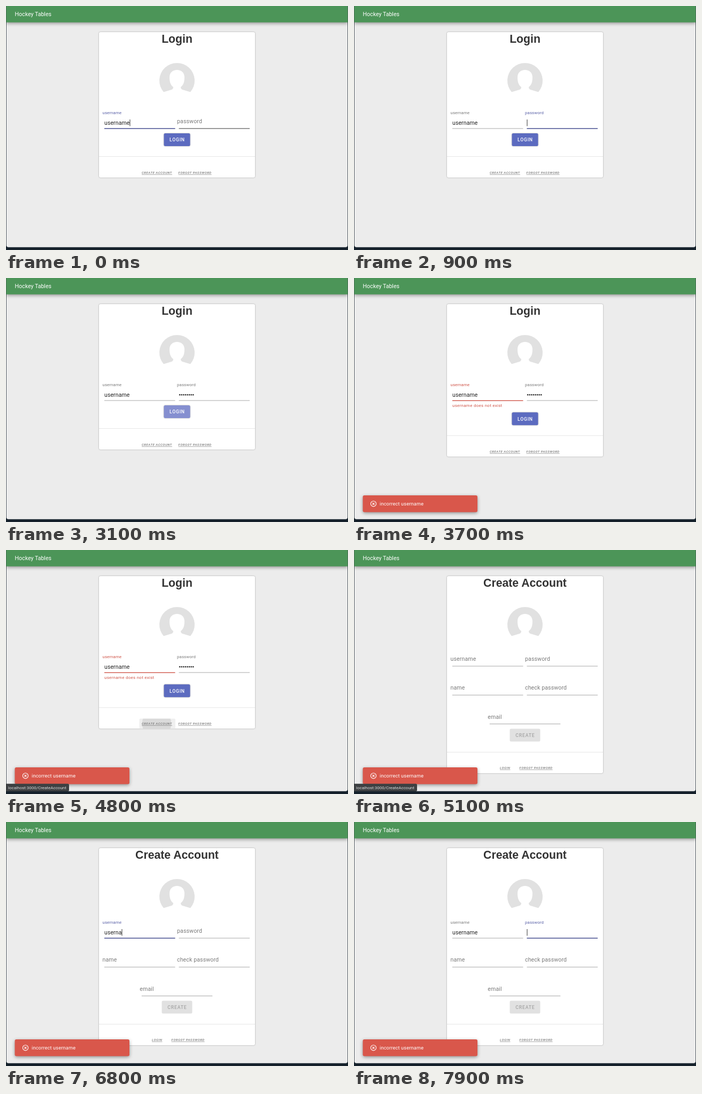
Write an HTML page that moves like this. It is 640 px wide and 458 px high and loops after 8000 ms.

```html
<!DOCTYPE html>
<html lang="en">
<head>
<meta charset="utf-8">
<title>Login flow</title>
<style>
  html, body { margin: 0; width: 100%; height: 100%; overflow: hidden; background: #16222c; }
  svg { display: block; }
  text { font-family: Roboto, sans-serif; white-space: pre; }
  .low { filter: drop-shadow(0 .7px 1px rgba(0, 0, 0, .35)); }
  .high { filter: drop-shadow(0 2px 3px rgba(0, 0, 0, .38)); }
</style>
</head>
<body>
<svg id="stage" width="640" height="458" viewBox="0 0 640 458"></svg>
<script>
const LOOP = 8000, STEP = 100;
const INDIGO = '#5b62a8', RED = '#d0564a', GRAY = '#7b7b7b';
const stage = document.getElementById('stage');
const pen = document.createElement('canvas').getContext('2d');

const ease = u => 1 - (1 - Math.min(1, Math.max(0, u))) ** 3;
const rect = (x, y, w, h, fill, extra = '') =>
  `<rect x="${x}" y="${y}" width="${w}" height="${h}" fill="${fill}" ${extra}/>`;
const text = (x, y, str, size, fill, spacing = 0.01, extra = '') =>
  `<text x="${x}" y="${y}" font-size="${size}" fill="${fill}" style="letter-spacing:${spacing}em" ${extra}>${str}</text>`;
const typed = (times, t) => times.filter(k => k <= t).length;

function textWidth(str) {
  pen.font = '10.5px Roboto, sans-serif';
  return pen.measureText(str).width + str.length * 0.105;
}

// Text field with floating label; y is the underline.
function field(t, { x, y, label, value = '', secret, focus = Infinity, blur = Infinity, keys = [], hover, error }) {
  const focused = t >= focus && t < blur;
  const lift = value ? 1 : ease((t - focus) / 150);
  const tint = error ? RED : focused ? INDIGO : GRAY;
  const lineTint = error ? RED : hover ? '#333' : '#a8a8a8';
  let out = text(x, y - 10 - 17 * lift, label, 10.6 - 2.7 * lift, tint);
  out += rect(x + 3.5, y - 0.5, 132.5, error ? 1.4 : 1, lineTint);
  if (focused) {
    const w = 132.5 * ease((t - focus) / 180);
    out += rect(x + 69.75 - w / 2, y - 0.7, w, 1.5, '#555c9f');
  }
  let end = x + 3.5;
  if (secret) {
    for (let i = 0; i < value.length; i++)
      out += `<circle cx="${x + 5.2 + i * 3.57}" cy="${y - 10.7}" r="1.25" fill="#222"/>`;
    end += value.length * 3.57;
  } else {
    out += text(x + 3.5, y - 7, value, 10.5, '#222');
    end += textWidth(value);
  }
  const last = Math.max(focus, ...keys.filter(k => k <= t));
  if (focused && (t - last) % 1000 < 500) out += rect(end, y - 17, 1, 12.5, '#333');
  return out;
}

const link = (x, y, str, line = '#777') =>
  text(x, y, str, 6, '#777', 0.09,
    `font-style="italic" font-weight="500" text-decoration="underline ${line}"`);

const avatar = `<path fill="#e1e1e1" d="M295 161.5A33 33 0 1 1 345 161.5
  L330 157Q327 156 327 152C332 149 334 142 334 134C334 125 328 120 320 120
  C312 120 306 125 306 134C306 142 308 149 313 152Q313 156 310 157Z"/>`;

function card(title, bottom) {
  return rect(174, 49, 292, bottom - 49, '#fff', 'rx="3" class="low"') +
    text(320, 69, title, 21.2, '#333', 0,
      'text-anchor="middle" font-weight="700" style="font-family:Liberation Sans,Arial,sans-serif"')
      .replace('style="letter-spacing:0em" ', '') +
    avatar + rect(174, bottom - 40, 292, 1, '#e6e6e6');
}

function button(x, y, w, label, fill, ink, extra = '') {
  return rect(x, y, w, 24, fill, 'rx="2.5" ' + extra) +
    text(x + w / 2 + 0.4, y + 15.2, label, 8.7, ink, 0.089, 'text-anchor="middle" font-weight="500"');
}

function ripple(x, y, w, h, r, ink, opacity) {
  return `<svg x="${x}" y="${y}" width="${w}" height="${h}"><circle cx="${w / 2}" cy="${h / 2}" r="${r}" fill="${ink}" opacity="${opacity}"/></svg>`;
}

function loginPage(t) {
  const failed = t >= 3400, drop = failed ? 13.3 : 0;
  const keys = [1300, 1300, 1300, 1400, 1400, 1600, 1700, 2300];
  const hot = t >= 2700 && t < 3600;
  let out = card('Login', 322 + drop);
  out += field(t, { x: 180.5, y: 230, label: 'username', value: 'username', focus: -400, blur: 600, error: failed });
  out += field(t, { x: 320, y: 230, label: 'password', value: '•'.repeat(typed(keys, t)), secret: true,
    focus: 600, blur: 3000, keys, hover: t < 600 });
  if (failed) out += text(184, 242, 'username does not exist', 8, RED, 0.033);
  out += button(295.5, 239 + drop, 49, 'LOGIN', hot ? '#6673c4' : '#5c6bc0', '#fff', 'class="low"');
  if (t >= 3000 && t < 3400)
    out += ripple(295.5, 239 + drop, 49, 24, 30 * ease((t - 2950) / 225), '#fff', 0.2);
  const over = t >= 4500;
  if (over) out += rect(249.5, 316.5, 67.5, 18.8, '#efefef', 'rx="2"');
  if (t >= 4700) out += ripple(249.5, 316.5, 65, 18.8, 33 * ease((t - 4700) / 225), '#000', 0.09);
  return out + link(254, 315 + drop, 'CREATE ACCOUNT', over ? '#c8665c' : '#777') +
    link(322.5, 315 + drop, 'FORGOT PASSWORD');
}

function createPage(t) {
  const keys = [6200, 6300, 6500, 6600, 6700, 6800, 7000, 7100];
  const name = 'username'.slice(0, typed(keys, t));
  let out = card('Create Account', 419);
  out += field(t, { x: 180.5, y: 218, label: 'username', value: name, focus: 5500, blur: 7500, keys });
  out += field(t, { x: 320, y: 218, label: 'password', focus: 7500 });
  out += field(t, { x: 180.5, y: 272.3, label: 'name' });
  out += field(t, { x: 320, y: 272.3, label: 'check password' });
  out += field(t, { x: 250.3, y: 326.5, label: 'email' });
  out += button(291.5, 335.5, 57, 'CREATE', '#e1e1e1', '#a5a5a5');
  out += link(273, 411.3, 'LOGIN') + link(309.5, 411.3, 'FORGOT PASSWORD');
  if (t >= 5600 && t < 6600)
    out += rect(184, 219, 132.5, 34.3, '#3f4244', 'rx="3" class="low"') +
      text(192, 239.7, 'user', 9, '#fff', 0.01, 'font-weight="500"');
  return out;
}

function toast(t) {
  const p = ease((t - 3350) / 150);
  return `<g opacity="${p}" transform="translate(124 424) scale(${0.8 + 0.2 * p}) translate(-124 -424)">` +
    rect(16.5, 408, 214.5, 31.5, '#d9574b', 'rx="3" class="high"') +
    `<g fill="none" stroke="#fff" stroke-width="1.1"><circle cx="36.4" cy="423.8" r="5.1"/>
     <path d="M34.4 421.8l4 4m0-4l-4 4"/></g>` +
    text(48, 427.2, 'incorrect username', 9.2, '#fff', 0.0178) + '</g>';
}

function render(t) {
  let out = rect(0, 0, 640, 458, '#16222c') + rect(0.7, -6, 638.6, 458.7, '#ececec', 'rx="4"');
  out += t < 5000 ? loginPage(t) : createPage(t);
  out += rect(0.5, -6, 639, 36.7, '#4c9558', 'class="high"');
  out += text(16.5, 18.7, 'Hockey Tables', 10.6, '#fff', 0);
  if (t >= 3400) out += toast(t);
  if (t >= 4500 && t < 5300)
    out += rect(-4, 438.7, 122, 14.3, '#3d4042', 'rx="2.5"') +
      text(4, 449, 'localhost:3000/CreateAccount', 8, '#dcdcdc', 0);
  stage.innerHTML = out;
}

const start = performance.now();
let shown = -1;
function tick() {
  const t = Math.floor((performance.now() - start) % LOOP / STEP) * STEP;
  if (t !== shown) render(shown = t);
  requestAnimationFrame(tick);
}
tick();
</script>
</body>
</html>
```
